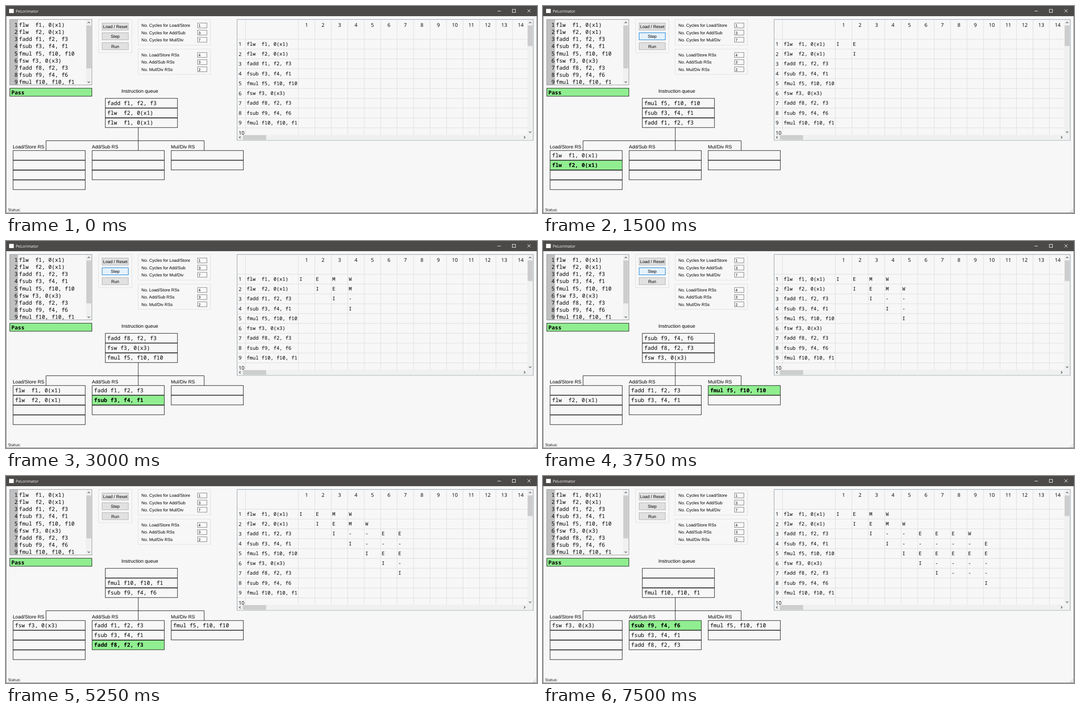
Write an HTML page with a canvas that moves like this. It is 1196 px wide and 468 px high and loops after 8 s.

```html
<!DOCTYPE html>
<html lang="en">
<head>
<meta charset="utf-8">
<title>PeLorimator</title>
<style>
html, body { margin: 0; width: 100%; height: 100%; overflow: hidden; background: #f7f7f7; }
canvas { display: block; }
</style>
</head>
<body>
<canvas id="stage" width="1196" height="468"></canvas>
<script>
const ctx = document.getElementById('stage').getContext('2d');
const LOOP = 8000, STEP = 750;
const MONO = '"Noto Sans Mono", monospace';
const SANS = '"Liberation Sans", sans-serif';
const UI = '"Open Sans", sans-serif';
const GREEN = '#90ee90', INK = '#111';
const UNIT = 0.742;                 // one window pixel on the stage
const ROW = 30 * UNIT, COL = 50 * UNIT;

// station: 0 load/store, 1 add/sub, 2 mul/div; free = cycle when the slot is released
const program = [
  { code: 'flw  f1, 0(x1)',    issue: 1,  stages: 'IEMW',    station: 0, slot: 0, free: 5 },
  { code: 'flw  f2, 0(x1)',    issue: 2,  stages: 'IEMW',    station: 0, slot: 1, free: 6 },
  { code: 'fadd f1, f2, f3',   issue: 3,  stages: 'I--EEEW', station: 1, slot: 0, free: 10 },
  { code: 'fsub f3, f4, f1',   issue: 4,  stages: 'I-----E', station: 1, slot: 1, free: 99 },
  { code: 'fmul f5, f10, f10', issue: 5,  stages: 'IEEEEE',  station: 2, slot: 0, free: 99 },
  { code: 'fsw f3, 0(x3)',     issue: 6,  stages: 'I----',   station: 0, slot: 0, free: 99 },
  { code: 'fadd f8, f2, f3',   issue: 7,  stages: 'I---',    station: 1, slot: 2, free: 99 },
  { code: 'fsub f9, f4, f6',   issue: 10, stages: 'I',       station: 1, slot: 0, free: 99 },
  { code: 'fmul f10, f10, f1', issue: 99, stages: '',        station: 2, slot: 1, free: 99 }
];
const stations = [
  { name: 'Load/Store RS', rows: 4 },
  { name: 'Add/Sub RS', rows: 3 },
  { name: 'Mul/Div RS', rows: 2 }
];

function text(str, x, y, size, family, { align = 'left', weight = 'normal', color = '#000' } = {}) {
  ctx.font = `${weight} ${size}px ${family}`;
  ctx.textRendering = 'geometricPrecision';
  ctx.textAlign = align;
  ctx.fillStyle = color;
  ctx.fillText(str, x, y);
}

function fill(x, y, w, h, color) {
  ctx.fillStyle = color;
  ctx.fillRect(x, y, w, h);
}

function box(x, y, w, h, stroke, inside) {
  if (inside) fill(x, y, w, h, inside);
  ctx.strokeStyle = stroke;
  ctx.lineWidth = 1;
  ctx.strokeRect(x, y, w, h);
}

function path(points, color, width = 1) {
  ctx.strokeStyle = color;
  ctx.lineWidth = width;
  ctx.beginPath();
  points.forEach(([x, y]) => ctx.lineTo(x, y));
  ctx.stroke();
}

function clip(x, y, w, h, draw) {
  ctx.save();
  ctx.beginPath();
  ctx.rect(x, y, w, h);
  ctx.clip();
  draw();
  ctx.restore();
}

function arrow(x, y, dx, dy) {
  const a = 2.6, b = 1.4;
  path([[x - dx * b - dy * a, y - dy * b - dx * a], [x + dx * b, y + dy * b],
        [x - dx * b + dy * a, y - dy * b + dx * a]], '#505050', 1.3);
}

function titleBar() {
  fill(0, 0, 1196, 23, '#4c4a48');
  fill(7, 6.5, 10.5, 9.5, '#fff');
  text('PeLorimator', 22, 15, 8.8, UI, { color: '#fff' });
  path([[1107, 11.5], [1114.5, 11.5]], '#fff');
  box(1140.5, 7.5, 7, 7, '#fff');
  path([[1174.5, 7.5], [1181.5, 14.5]], '#fff');
  path([[1181.5, 7.5], [1174.5, 14.5]], '#fff');
}

function editor() {
  box(8.5, 30.5, 185, 148, '#8a9299', '#f7f7f7');
  fill(9, 31, 18, 147, '#c0c0c0');
  clip(9, 31, 171, 147, () => program.forEach((p, i) => {
    const y = 46.8 + i * 16.2;
    text(i + 1, 26.3, y, 12.3, MONO, { align: 'right' });
    text(p.code, 29, y, 12.3, MONO);
  }));
  fill(180, 31, 13, 147, '#f0f0f0');
  fill(181, 44, 11, 97, '#cdcdcd');
  arrow(186.5, 37.5, 0, -1);
  arrow(186.5, 172, 0, 1);
  box(8.6, 185.9, 184.8, 18.1, INK, GREEN);
  text('Pass', 12, 199.7, 12.3, MONO, { weight: 'bold' });
}

function button(label, y, hot) {
  box(216.5, y, 59, 16, hot ? '#0078d7' : '#adadad', hot ? '#e5f1fb' : '#e1e1e1');
  text(label, 246, y + 11.7, 9.7, SANS, { align: 'center' });
}

function settings(y, h, first, rows) {
  box(297.5, y, 163, h, '#dfdfdf');
  rows.forEach(([label, value], i) => {
    const cy = first + i * 16.2;
    text(label, 305, cy + 3.4, 9.6, SANS);
    box(431.5, cy - 5.5, 21, 11, '#7a7a7a', '#fafafa');
    text(value, 433.5, cy + 3.4, 8.5, SANS);
  });
}

function slots(x, y, count, items) {
  for (let i = 0; i < count; i++) {
    const top = y + i * ROW, item = items[i];
    box(x, top, 219 * UNIT, 29 * UNIT, INK, item && item.hot ? GREEN : null);
    if (item) text(item.code, x + 4.3, top + 14.7, 12.35, MONO, { weight: item.hot ? 'bold' : 'normal' });
  }
}

function machine(cycle) {
  const left = 15.95, top = 326.8, bus = 304.6;
  const at = n => left + n * UNIT;

  text('Instruction queue', 260, 195.8, 10.8, SANS);
  const waiting = program.filter(p => p.issue > cycle).slice(0, 3);
  slots(at(280), 208.8, 3, [waiting[2], waiting[1], waiting[0]]);

  path([[at(380), 274.8], [at(380), top]], INK);
  path([[at(100), top], [at(100), bus], [at(580), bus], [at(580), top]], INK);

  stations.forEach((s, n) => {
    const x = at(n * 240), items = [];
    program.forEach(p => {
      if (p.station === n && p.issue <= cycle && cycle < p.free)
        items[p.slot] = { code: p.code, hot: p.issue === cycle };
    });
    text(s.name, x - 0.6, 321.8, 10.8, SANS);
    slots(x, top, s.rows, items);
  });
}

function table(cycle) {
  box(520.5, 30.5, 667, 273.3, '#8a9aa6', '#f7f7f7');
  clip(521, 31, 653, 260, () => {
    const grid = '#dcdcdc';
    path([[539.5, 31], [539.5, 291]], grid);
    for (let c = 0; c < 14; c++) {
      const x = 658.4 + c * COL;
      path([[x, 31], [x, 291]], grid);
      text(c + 1, 677 + c * COL, 46.5, 11.5, UI, { align: 'center' });
    }
    for (let r = 0; r < 10; r++) {
      const y = 75.1 + r * ROW;
      path([[521, y], [1174, y]], grid);
      text(r + 1, 524, 90.4 + r * ROW, 11.5, UI);
    }
    program.forEach((p, r) => {
      const y = 89.8 + r * ROW;
      text(p.code, 542, y, 11.2, MONO);
      [...p.stages].forEach((stage, k) => {
        const c = p.issue + k;
        if (c <= cycle) text(stage, 660.8 + (c - 1) * COL, y, 11.2, MONO);
      });
    });
  });
  fill(1174, 31, 13, 260, '#f0f0f0');
  fill(521, 291, 666, 12.3, '#f0f0f0');
  fill(1175, 44, 11, 46.5, '#cdcdcd');
  fill(533.5, 292, 52.5, 10.5, '#cdcdcd');
  arrow(1180.5, 37.5, 0, -1);
  arrow(1180.5, 285, 0, 1);
  arrow(527, 297, -1, 0);
  arrow(1168, 297, 1, 0);
}

function frame(now) {
  const cycle = Math.floor((now % LOOP) / STEP);
  fill(0, 0, 1196, 468, '#f7f7f7');
  titleBar();
  editor();
  box(208.5, 30.5, 75, 75, '#dfdfdf');
  button('Load / Reset', 38.5, false);
  button('Step', 60.5, ![0, 7, 10].includes(cycle));
  button('Run', 82.8, false);
  settings(30.5, 58, 44, [['No. Cycles for Load/Store', 1], ['No. Cycles for Add/Sub', 3], ['No. Cycles for Mul/Div', 7]]);
  settings(97.5, 57, 110.7, [['No. Load/Store RSs', 4], ['No. Add/Sub RSs', 3], ['No. Mul/Div RSs', 2]]);
  machine(cycle);
  table(cycle);
  text('Status:', 5, 463.5, 8.8, UI);
  for (let i = 0; i < 3; i++)
    for (let j = 0; j <= i; j++) fill(1192 - j * 3, 459 + i * 3, 1.5, 1.5, '#bfbfbf');
  path([[0.5, 22], [0.5, 467.5], [1195.5, 467.5], [1195.5, 22]], '#777');
}

const start = performance.now();
function tick() {
  frame(performance.now() - start);
  requestAnimationFrame(tick);
}
tick();
</script>
</body>
</html>
```
